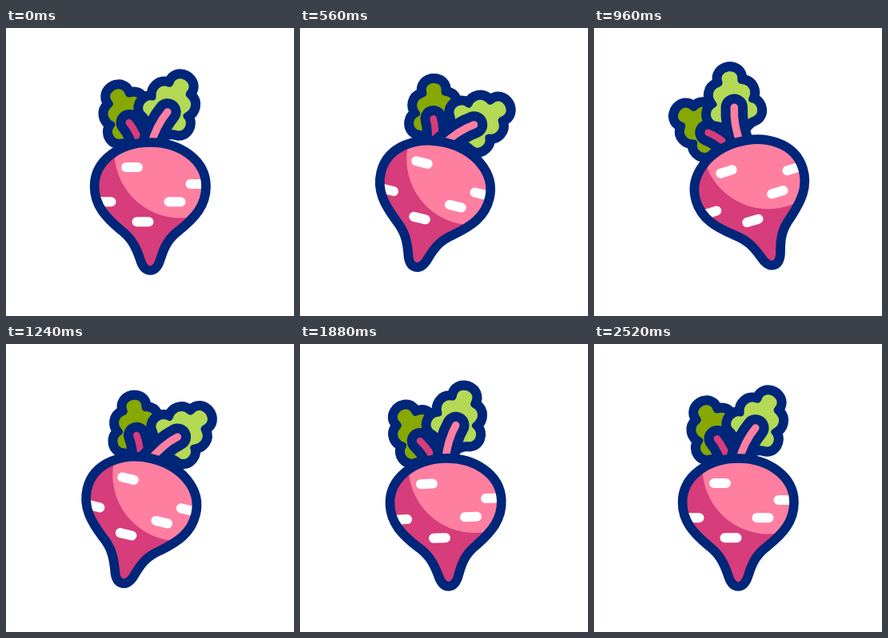
Animation, 360 px wide and 360 px high, one loop 2800 ms. Source, as an HTML page with a canvas:

```html
<!DOCTYPE html>
<html lang="en">
<head>
<meta charset="utf-8">
<title>Swinging radish</title>
<style>
  html, body { margin: 0; width: 100%; height: 100%; overflow: hidden; background: #fff; }
  canvas { display: block; }
</style>
</head>
<body>
<canvas id="stage" width="360" height="360"></canvas>
<script>
const ctx = document.getElementById('stage').getContext('2d');
const LOOP = 2800, STEP = 40;
const NAVY = '#00267a', PINK = '#ff7fa1', DEEP = '#d63d7a';

// Swing keys: [time in ms, degrees]
const BODY = [[0, 0], [500, 15.3], [915, -18.2], [1280, 14.2], [1670, -11.9], [2080, 6.8], [2490, 0]];
const LEAF = [[0, 0], [530, 31], [935, -37.5], [1310, 28], [1715, -24], [2120, 14], [2520, 0]];

function swing(keys, t) {
  const i = keys.findIndex(key => key[0] > t);
  if (i < 0) return 0;
  const [t0, a] = keys[i - 1], [t1, b] = keys[i];
  return a + (b - a) * (1 - Math.cos(Math.PI * (t - t0) / (t1 - t0))) / 2;
}

const body = new Path2D('M110.6 198C110.6 165 143 143 180.3 143S250 165 250 198C250 222 236 237 217 252.5' +
  'C203 263 198 273 193.3 288C191 296 187 303 180.3 303S169.5 296 167.3 288C162 273 157 263 143.5 252.5' +
  'C125 237 110.6 222 110.6 198Z');

// Right half of a leaf that points up
const halfLeaf = new Path2D('M-1 -89.5H0C7 -89.5 11 -85 10 -79C9 -73 12 -72 16 -71C24 -69 26 -60 22 -54' +
  'C19 -49 21 -47 25 -45.5C32 -42 32 -30 24 -28C17 -26 14 -24 8 -18H-1Z');
const leftStem = new Path2D('M-4 4Q0 -18 -3 -33');
const rightStem = new Path2D('M3 4Q-3 -22 1 -43');

function turned(x, y, degrees, draw) {
  ctx.save();
  ctx.translate(x, y);
  ctx.rotate(degrees * Math.PI / 180);
  draw();
  ctx.restore();
}

function stroke(path, color, width) {
  ctx.strokeStyle = color;
  ctx.lineWidth = width;
  ctx.stroke(path);
}

function fill(path, color) {
  ctx.fillStyle = color;
  ctx.fill(path);
}

function mirrored(draw) {
  draw();
  ctx.scale(-1, 1);
  draw();
}

function leaf(shift, scale, green, stem, stemColor, stemWidth) {
  ctx.save();
  ctx.translate(0, shift);
  ctx.scale(scale, scale);
  mirrored(() => stroke(halfLeaf, NAVY, 24 / scale));
  mirrored(() => fill(halfLeaf, green));
  ctx.restore();
  stroke(stem, NAVY, stemWidth + 24);
  stroke(stem, stemColor, stemWidth);
}

function drawBody() {
  ctx.translate(-180, -150);
  ctx.save();
  ctx.clip(body);
  fill(body, DEEP);
  const light = new Path2D();
  light.arc(218, 155, 82.5, 0, 7);
  fill(light, PINK);
  const marks = new Path2D();
  for (const [x, y] of [[157.5, 174], [238, 195], [124, 217.3], [211, 217.3], [171, 242.3]])
    marks.roundRect(x - 13.5, y - 6, 27, 12, 6);
  fill(marks, '#fff');
  ctx.restore();
  stroke(body, NAVY, 11.7);
}

function frame(now) {
  const t = Math.floor(now % LOOP / STEP) * STEP;
  const leafAngle = swing(LEAF, t);
  ctx.fillStyle = '#fff';
  ctx.fillRect(0, 0, 360, 360);
  ctx.lineCap = ctx.lineJoin = 'round';
  turned(172, 146, -28 + leafAngle * 0.8, () => leaf(6, 0.93, '#86a800', leftStem, DEEP, 8.5));
  turned(180, 142, 29.2 + leafAngle, () => leaf(-1.5, 0.97, '#b4d954', rightStem, PINK, 9.5));
  turned(180, 150, swing(BODY, t), drawBody);
}

const start = performance.now();
function tick() {
  frame(performance.now() - start);
  requestAnimationFrame(tick);
}
tick();
</script>
</body>
</html>
```
